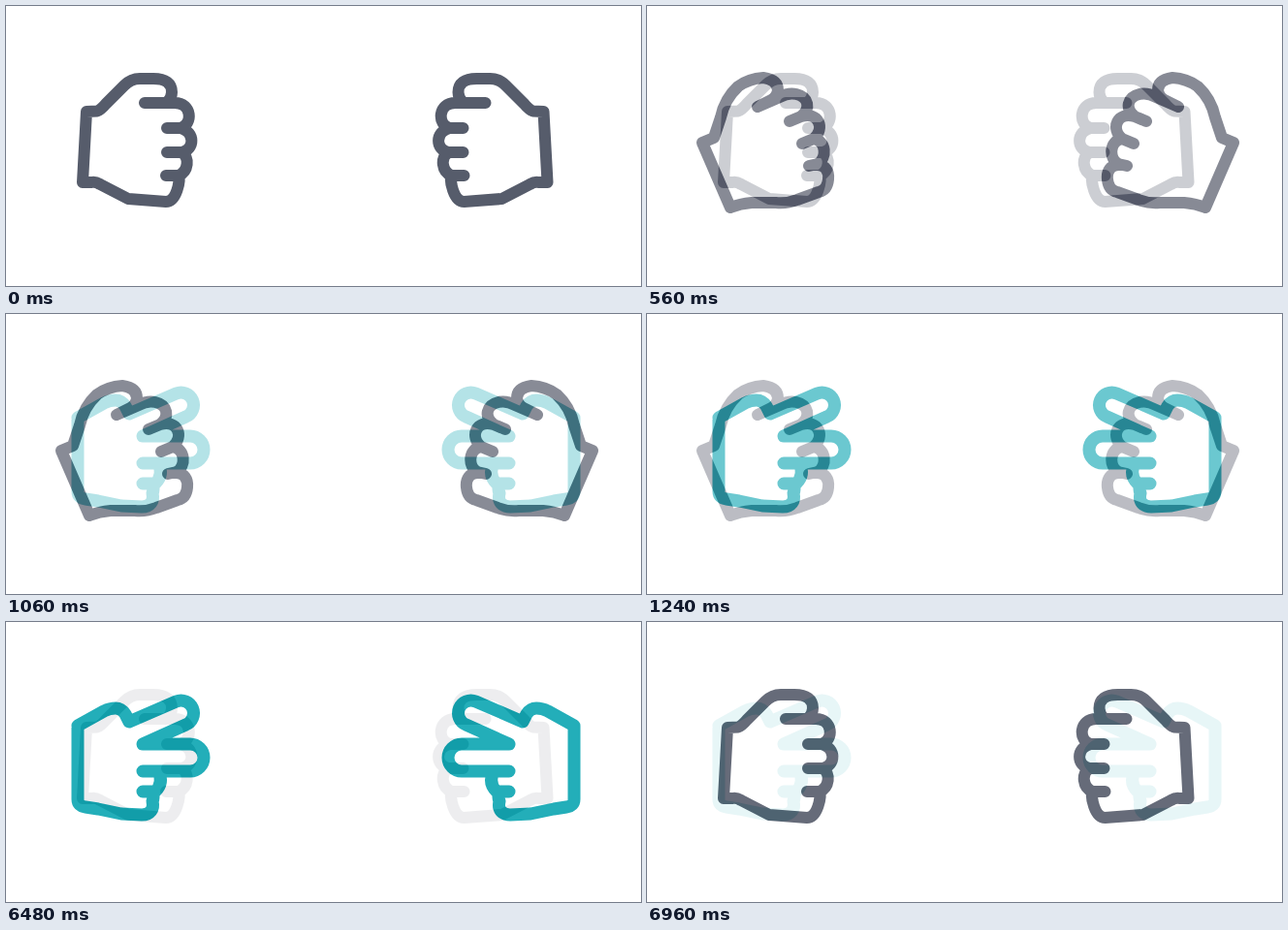
An HTML page that plays this animation: 655 by 289 pixels, repeating every 7.02 s.

```html
<!DOCTYPE html>
<html lang="en">
<head>
<meta charset="utf-8">
<title>Hands</title>
<style>
html, body { margin: 0; width: 100%; height: 100%; overflow: hidden; background: #fff; }
svg { display: block; width: 655px; height: 289px; }
path { fill: none; stroke-linecap: round; stroke-linejoin: round; }
</style>
</head>
<body>
<svg id="stage" viewBox="0 0 655 289"></svg>
<script>
const LOOP = 7020, STEP = 60;

// mirror: the sum of the x positions of a point and its reflection
const poses = [
  { color: '#565c6b', width: 12, mirror: 637.5, d: `
    M79 182 L83 109 L94 108.5 Q98 107 103 101 L122 82 Q129 75 138 75
    L152 75 Q171 75 171 89 Q171 95 166 100
    M143 100 H174 C192 100 193 122 180 126 H166
    M180 126 C195 130 195 148 181 151 H166
    M181 151 C190 156 188 171 178 175 H165
    M178 175 C180 180 176 202 165 202 L126 199 L97 184 Q92 181 88 182 L79 182` },
  { color: '#555969', width: 12, mirror: 662, d: `
    M86 208 L57 141 L69 136 L76 115 Q80 96 94 83 Q105 75 120 74
    Q135 76 135 87 Q134 94 128 97 L114 104
    L137 94 Q146 89 154 91 C167 94 169 106 159 114 L147 119
    M159 114 C177 109 184 126 172 137 L160 142
    M172 137 C185 139 186 157 176 163 L167 165
    M174 164 C184 163 188 171 187 179 Q186 190 177 192
    L155 200 Q145 204 133 203 L108 203 Q96 204 86 208` },
  { color: '#0aa5b1', width: 13, mirror: 660, d: `
    M74 107 L101 92 Q107 89 113 89 Q119 89 123 95 L127 103
    L175.5 82 A13 13 0 0 1 185.5 106 L141 126
    H190 A14 14 0 0 1 190 154 H141
    M157 154 Q163 166 154 175 H141
    M151 175 Q153 181 151 185 C153 193 149 199 140 199
    L119 198 L95 193 L82 191 Q74 190 74 183 V107` }
];

const fades = [
  { start: 200, from: 0, to: 1 },
  { start: 940, from: 1, to: 2 },
  { start: 6480, from: 2, to: 0 }
];

const stage = document.getElementById('stage');

// Each pose carries its own white ground, so stacking two gives a linear mix.
const layers = poses.map(({ color, width, mirror, d }) => {
  const g = document.createElementNS('http://www.w3.org/2000/svg', 'g');
  const hand = flip =>
    `<path d="${d}" stroke="${color}" stroke-width="${width}" transform="${flip}"/>`;
  g.innerHTML = '<rect width="655" height="289" fill="#fff"/>' +
    hand('scale(1)') + hand(`translate(${mirror}) scale(-1 1)`);
  stage.append(g);
  return g;
});

let shown = '';

function draw(now) {
  const t = now % LOOP;
  const fade = fades.filter(f => t >= f.start).pop();
  const { from, to, start } = fade || { from: 0, to: 0, start: 0 };
  const mix = fade ? Math.min(10, Math.floor((t - start) / STEP) + 1) / 10 : 1;
  const key = `${from} ${to} ${mix}`;
  if (key === shown) return;
  shown = key;
  layers.forEach((g, i) => {
    g.style.display = i === from || i === to ? '' : 'none';
    g.style.opacity = i === to ? mix : 1;
  });
  if (stage.lastChild !== layers[to]) stage.append(layers[to]);
}

const begin = performance.now();
function tick() {
  draw(performance.now() - begin);
  requestAnimationFrame(tick);
}
tick();
</script>
</body>
</html>
```
